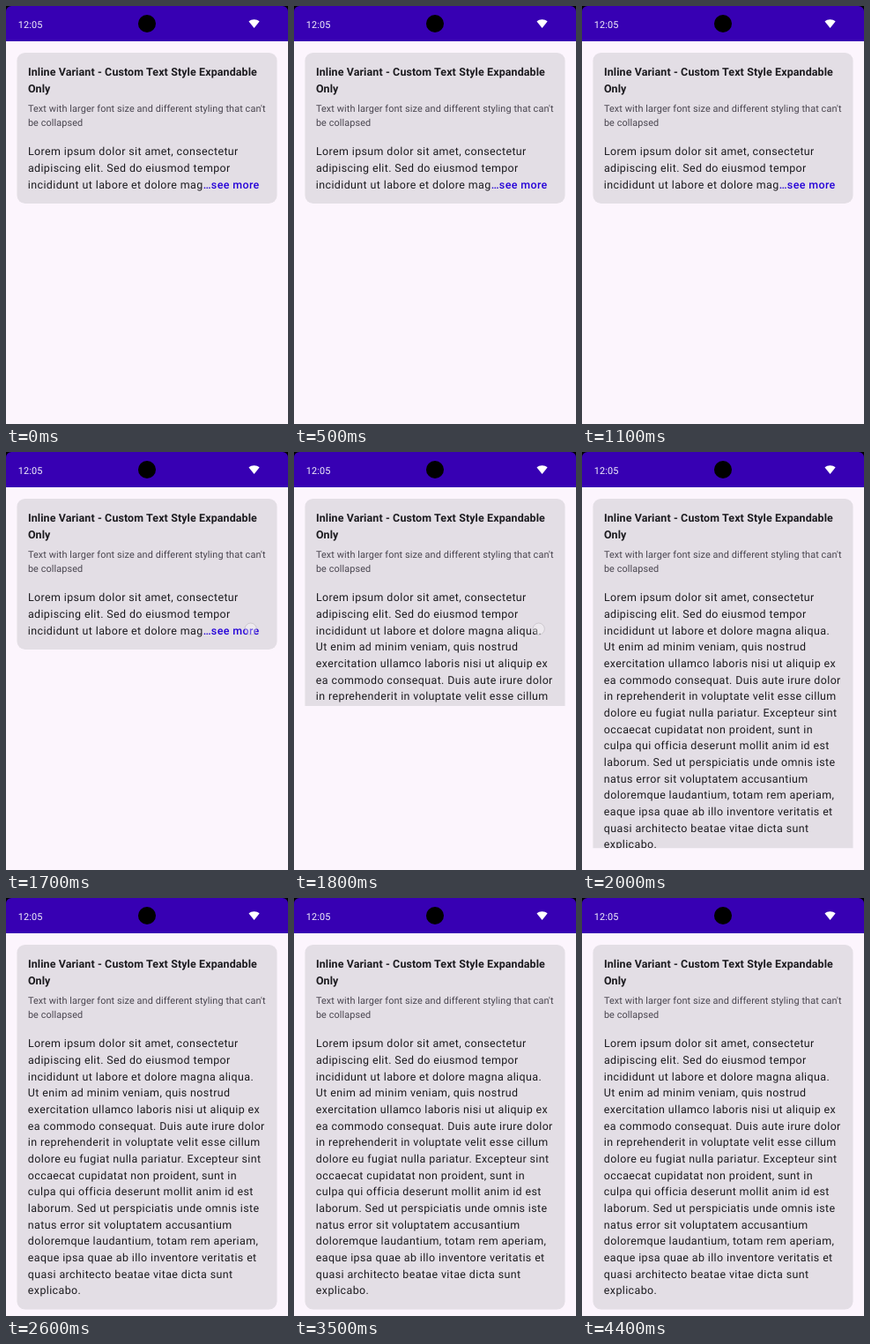
These frames come from a looping animation (320x474 px, 4.5 s). An HTML page:

```html
<!DOCTYPE html>
<html lang="en">
<head>
<meta charset="utf-8">
<title>Expandable text card</title>
<style>
  html, body { margin: 0; width: 100%; height: 100%; overflow: hidden; background: #fcf5fd; }
  svg { display: block; width: 320px; height: 474px; }
  text { font-family: Roboto, sans-serif; text-rendering: geometricPrecision; white-space: pre; }
  .clock { font-size: 14px; letter-spacing: .15px; fill: #f4f0fb; }
  .title { font-size: 16px; font-weight: 700; letter-spacing: .15px; fill: #1c1b1f; }
  .sub { font-size: 14px; letter-spacing: .115px; fill: #49454f; }
  .body { font-size: 16px; letter-spacing: .5px; fill: #1c1b1f; }
  .more { font-weight: 500; fill: #2400d8; }
</style>
</head>
<body>
<!-- Drawn in dp: 1080 px wide screen at density 2.625 -->
<svg viewBox="0 0 411.43 609.43">
  <defs>
    <clipPath id="reveal"><rect id="window" x="0" y="0" width="412" height="288"/></clipPath>
  </defs>
  <rect width="412" height="610" fill="#fcf5fd"/>
  <rect width="412" height="51.43" fill="#3700b3"/>
  <path d="M0 0H8A8 8 0 0 0 0 8ZM411.43 0H403.43A8 8 0 0 1 411.43 8Z"/>
  <circle cx="205.7" cy="25.7" r="12.9"/>
  <text class="clock" x="17.6" y="31.5">12:05</text>
  <path d="M362 32L354.2 22.4C358.6 18.6 365.4 18.6 369.8 22.4Z" fill="#fff"/>
  <g clip-path="url(#reveal)">
    <rect id="card" x="16" y="68" width="379.43" height="220" rx="12" fill="#e3dee5"/>
    <!-- The tiny turn keeps baselines from snapping to whole pixels -->
    <g transform="rotate(.004)">
      <g id="head"></g>
      <g id="short"></g>
      <g id="full"></g>
    </g>
  </g>
  <circle id="touch" cx="357" cy="258" r="8.5" fill="#fff" fill-opacity=".35" stroke="#aaa6ac" stroke-opacity=".55"/>
</svg>
<script>
  const $ = id => document.getElementById(id);
  const LOOP = 4500, STEP = 100;
  const SHUT = 288, OPEN = 600;
  const START = 1739.4, RATE = 0.0165;

  const lines = [
    'Lorem ipsum dolor sit amet, consectetur',
    'adipiscing elit. Sed do eiusmod tempor',
    'incididunt ut labore et dolore magna aliqua.',
    'Ut enim ad minim veniam, quis nostrud',
    'exercitation ullamco laboris nisi ut aliquip ex',
    'ea commodo consequat. Duis aute irure dolor',
    'in reprehenderit in voluptate velit esse cillum',
    'dolore eu fugiat nulla pariatur. Excepteur sint',
    'occaecat cupidatat non proident, sunt in',
    'culpa qui officia deserunt mollit anim id est',
    'laborum. Sed ut perspiciatis unde omnis iste',
    'natus error sit voluptatem accusantium',
    'doloremque laudantium, totam rem aperiam,',
    'eaque ipsa quae ab illo inventore veritatis et',
    'quasi architecto beatae vitae dicta sunt',
    'explicabo.'
  ];

  function addText(parent, cls, rows, top, gap) {
    parent.innerHTML += rows.map((row, i) =>
      `<text class="${cls}" x="32" y="${top + i * gap}">${row}</text>`).join('');
  }

  addText($('head'), 'title', ['Inline Variant - Custom Text Style Expandable', 'Only'], 101.5, 24);
  addText($('head'), 'sub', ["Text with larger font size and different styling that can't", 'be collapsed'], 154.8, 20);
  addText($('short'), 'body', [
    lines[0], lines[1],
    'incididunt ut labore et dolore mag<tspan class="more">…see more</tspan>'
  ], 217.5, 24);
  addText($('full'), 'body', lines, 217.5, 24);

  // Critically damped spring from 0 to 1
  function spring(u) {
    return u > 10 ? 1 : 1 - (1 + u) * Math.exp(-u);
  }

  const show = (el, on) => el.setAttribute('visibility', on ? 'visible' : 'hidden');

  function draw(now) {
    const t = Math.floor(now % LOOP / STEP) * STEP;
    const open = t >= START;
    const bottom = open ? SHUT + (OPEN - SHUT) * spring((t - START) * RATE) : SHUT;
    $('window').setAttribute('height', bottom);
    $('card').setAttribute('height', (open ? OPEN : SHUT) - 68);
    show($('short'), !open);
    show($('full'), open);
    show($('touch'), t >= 1700 && t < 1900);
  }

  const begin = performance.now();
  function tick() {
    draw(performance.now() - begin);
    requestAnimationFrame(tick);
  }
  tick();
</script>
</body>
</html>
```
